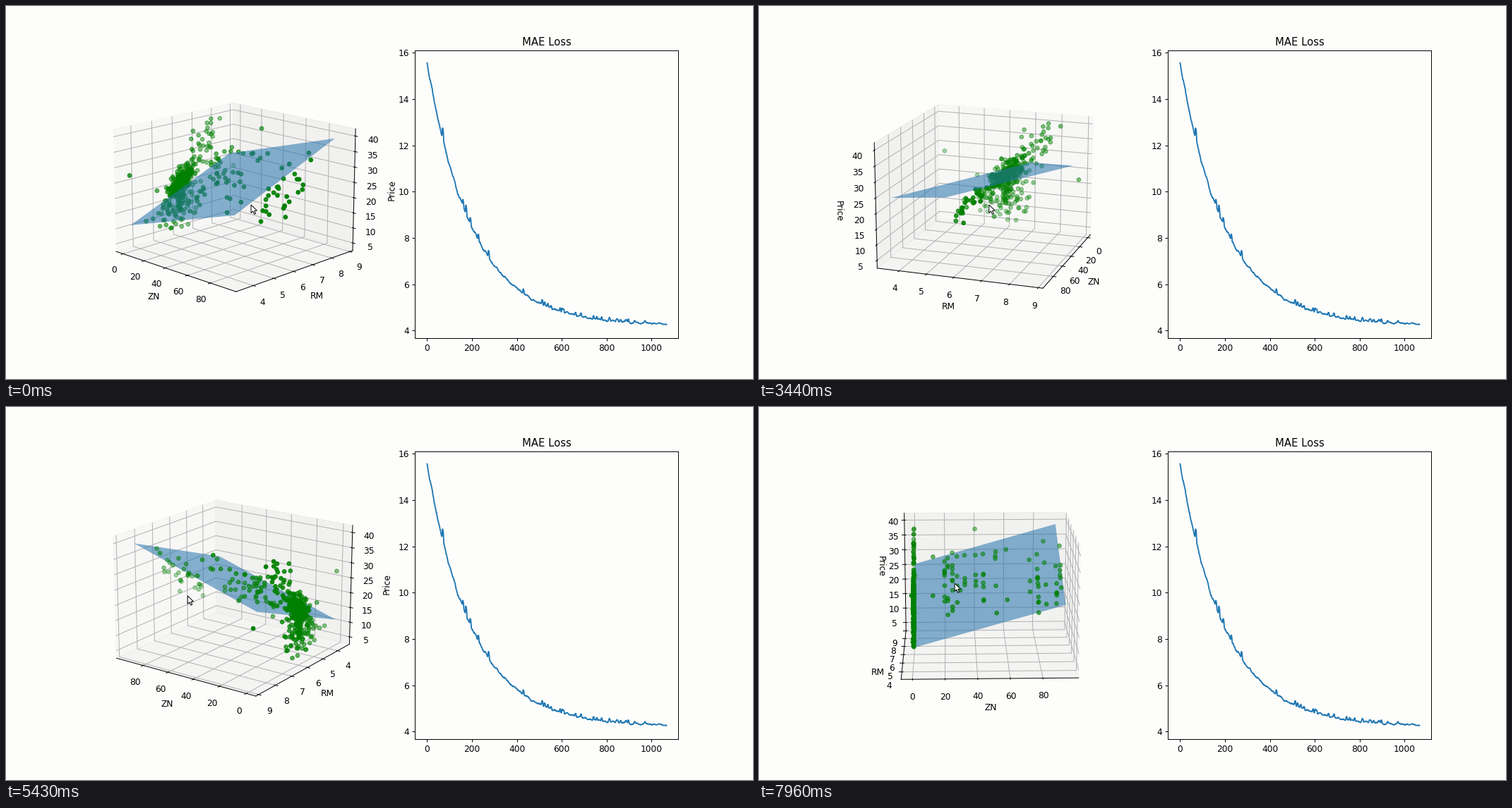
These frames come from a looping animation (1058 by 529 pixels, 8000 ms). A matplotlib script:

```python
import numpy as np
import matplotlib.pyplot as plt
from matplotlib.animation import FuncAnimation
from matplotlib.patches import Polygon
from matplotlib.transforms import IdentityTransform

W, H = 1058, 529
FRAMES, INTERVAL = 100, 80
BG = "#fdfdfb"
BLUE = "#1f77b4"
rng = np.random.default_rng(7)

# turn of the camera: frame and azimuth
STEPS = [6, 17, 30, 34, 39, 51, 60, 67, 81, 89, 92, 95, 97, 99]
AZIMS = [-45.7, -31.7, -12, 3, 3, 51.7, 75, 125.4, 183, 222, 248, 264, 264,
         268.4]
GRIPS = np.array([-54.3, 3, 78, 153, 228])  # azimuth where each drag begins
GRIP_X, DRAG = 366, 2.2                     # pointer start, pixels per degree
LEAD = 0.5                                  # frames the pointer runs ahead


def azimuth(i):
    return np.interp(i, STEPS, AZIMS)


def elevation(azim):
    return np.interp(azim, [-46, -12, 52, 125, 222], [16, 15.5, 17.8, 18.5, 14.7])


def pointer_tip(i):
    azim = azimuth(i + LEAD)
    grip = GRIPS[GRIPS <= azim][-1]
    return GRIP_X - DRAG * (azim - grip), np.interp(azim, [52, 222], [282, 250])


def homes():
    """Zoning share, rooms and price of each home."""
    core = rng.normal(6.08, 0.36, 205)
    poor = rng.normal(6.0, 0.52, 95)
    rich = rng.uniform(6.5, 7.7, 34)
    outliers = np.array([3.56, 8.78, 8.06])
    zones = [12.5, 20, 20, 22, 25, 28, 30, 33, 40, 45, 53, 60, 75, 80, 80, 80,
             85, 92, 95]
    zn = rng.choice(zones, 85)
    zoned_price = rng.normal(26.5, 5.6, zn.size)
    zoned = 6.35 + 0.1 * (zoned_price - 24) + rng.normal(0, 0.2, zn.size)
    price = np.concatenate([
        21.3 + 4 * (core - 6.1) + rng.normal(0, 2.2, core.size),
        14 + rng.normal(0, 3.9, poor.size),
        25 + 9 * (rich - 6.5) + rng.normal(0, 4.2, rich.size),
        [27.5, 21.9, 39.2],
        zoned_price,
    ])
    rooms = np.concatenate([core, poor, rich, outliers, zoned])
    zn = np.concatenate([np.zeros(rooms.size - zn.size), zn])
    inside = (price > 5) & (price < 39.8)
    return zn[inside], rooms[inside], price[inside]


def loss_curve():
    """Exponential decay with a soft wobble and shrinking spikes."""
    x = np.arange(0, 1067)
    fade = np.exp(-x / 204)
    y = 4.22 + 11.3 * fade
    wobble = rng.normal(0, 1, x.size + 10)
    y += np.convolve(wobble, np.ones(11) / 11, "valid") * (0.06 + 0.12 * fade)
    early = [70, 160, 174, 193, 228, 274, 429]
    late = rng.uniform(490, 1000, 22)
    for pos in np.concatenate([early, late]):
        height = (0.08 + 0.42 * np.exp(-pos / 400)) * rng.uniform(0.6, 1)
        y += height * np.exp(-((x - pos) / 3) ** 4)
    return x, y


fig = plt.figure(figsize=(12, 6), dpi=W / 12, facecolor=BG)
room = fig.add_subplot(121, projection="3d", computed_zorder=False,
                       facecolor=BG)
loss = fig.add_subplot(122, facecolor=BG)

dots = room.scatter(*homes(), c="green")
px, py = np.meshgrid([0, 94], [3.56, 8.56])
pz = 11.2 + 0.139 * px + 3.05 * (py - 3.56)
plane = room.plot_surface(px, py, pz, color="#2472ab", alpha=0.55,
                          shade=False, linewidth=0, zorder=2)
room.set(xlim=(-6.93, 101.93), ylim=(3.18, 9.16), zlim=(2.46, 42.34),
         xticks=range(0, 100, 20), yticks=range(4, 10),
         zticks=range(5, 45, 5), xlabel="ZN", ylabel="RM", zlabel="Price")

loss.plot(*loss_curve(), color=BLUE, lw=1.5)
loss.set(xlim=(-53.4, 1119), ylim=(3.68, 16.09), title="MAE Loss",
         xticks=range(0, 1001, 200), yticks=range(4, 17, 2))

ARROW = np.array([(0, 0), (0, 11.5), (2.7, 9), (4.6, 13.3), (6.5, 12.5),
                  (4.7, 8.3), (8.4, 8.1)])
pointer = Polygon(ARROW, closed=True, fc="white", ec="black", lw=0.8,
                  transform=IdentityTransform(), zorder=20)
fig.add_artist(pointer)


def draw(i):
    azim = azimuth(i)
    room.view_init(elev=elevation(azim), azim=azim)
    # past a quarter turn the dots lie in front of the plane
    dots.set_zorder(3 if azim > 90 else 1)
    x, y = pointer_tip(i)
    pointer.set_xy(ARROW * (1, -1) + (x, H - y))
    return dots, plane, pointer


anim = FuncAnimation(fig, draw, frames=FRAMES, interval=INTERVAL,
                     init_func=lambda: draw(0), repeat=True, repeat_delay=0,
                     blit=False)
plt.show()
```
